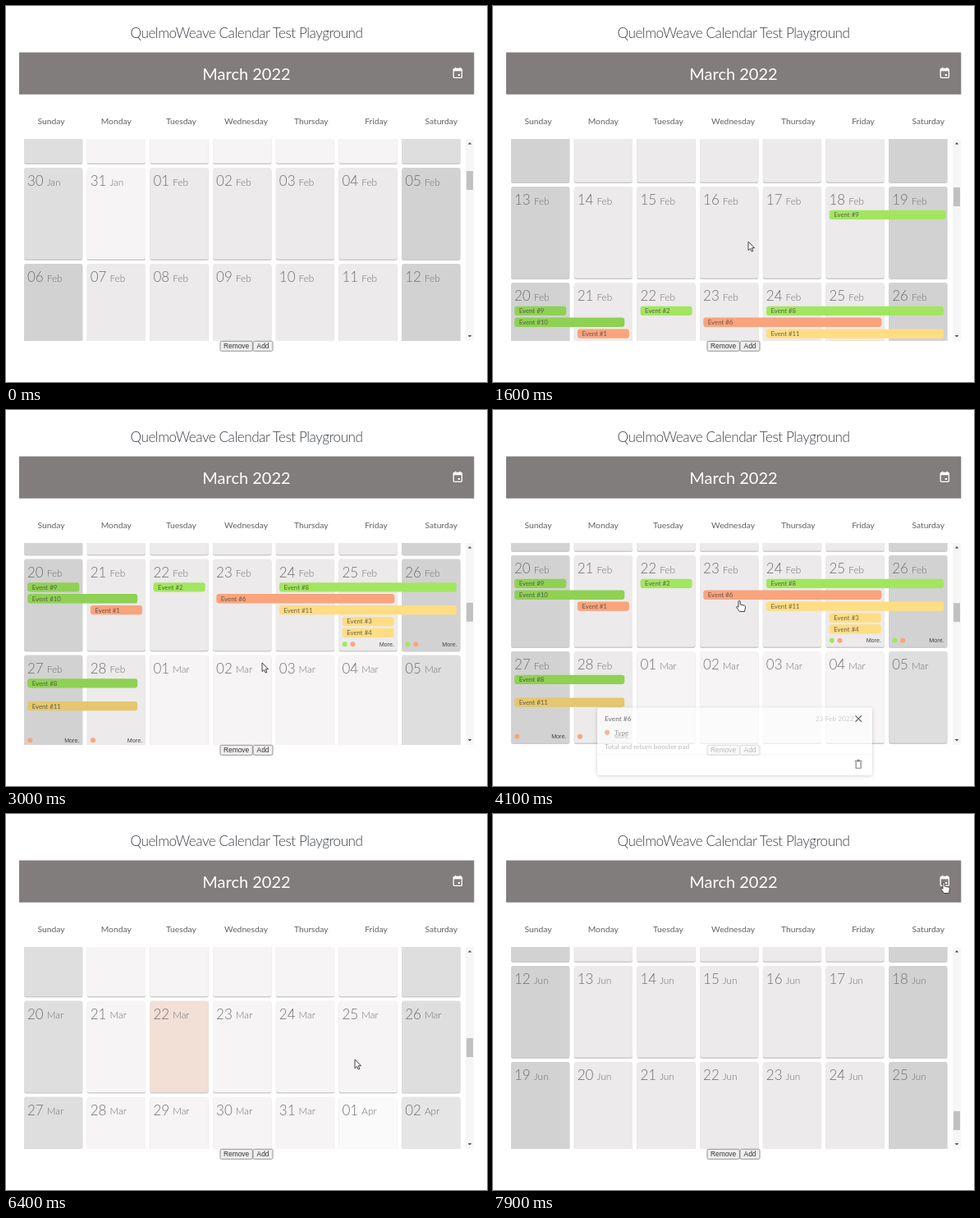
Write an HTML page that moves like this. It is 586 by 458 pixels and loops after 8 s.

```html
<!DOCTYPE html>
<html lang="en">
<head>
<meta charset="utf-8">
<title>Calendar playground</title>
<style>
  html, body { margin: 0; width: 100%; height: 100%; overflow: hidden; background: #fff; }
  svg { display: block; width: 586px; height: 458px; font-family: Lato, "Open Sans", sans-serif; }
  .title { font-size: 17.2px; font-weight: 300; letter-spacing: -.5px; fill: #3c4046; }
  .mid { text-anchor: middle; }
  .month { font-size: 20px; fill: #fff; }
  .weekday { font-size: 10.3px; fill: #626262; }
  .day { font-size: 17px; font-weight: 300; fill: #707070; }
  .day .name { font-size: 11.8px; fill: #707070; }
  .event { font-size: 7.8px; fill: #444; fill-opacity: .8; }
  .more { font: 7.2px "Liberation Sans", Arial, sans-serif; fill: #444; text-anchor: end; }
  .button { font: 8.4px "Liberation Sans", Arial, sans-serif; fill: #333; }
  .small { font-size: 8.3px; }
</style>
</head>
<body>
<svg viewBox="0 0 586 458">
  <defs>
    <clipPath id="view"><rect x="16" y="162" width="543" height="246"/></clipPath>
    <filter id="soft" x="-10%" y="-10%" width="120%" height="130%">
      <feDropShadow dx="0" dy="1" stdDeviation="2.5" flood-opacity=".28"/>
    </filter>
  </defs>
  <rect width="586" height="458" fill="#fff"/>
  <text class="title mid" x="293" y="39">QuelmoWeave Calendar Test Playground</text>
  <rect x="16" y="56.5" width="554.3" height="51.2" fill="#827d7d"/>
  <text class="month mid" x="293" y="90">March 2022</text>
  <g fill="none" stroke="#fff" stroke-width="1.3">
    <rect x="545.2" y="76.5" width="10.2" height="10.8" rx="1"/>
    <path d="M545 78h10.6" stroke-width="2.6"/>
    <path d="M547.6 74.8v2M553 74.8v2"/>
    <path d="M550.8 84h2.2" stroke-width="2"/>
  </g>
  <g id="weekdays"></g>
  <g clip-path="url(#view)"><g id="grid"></g></g>
  <rect x="560" y="162" width="10" height="246" fill="#f6f6f6"/>
  <path d="M562.6 168.5l2.4-2.6 2.4 2.6zM562.6 401l2.4 2.6 2.4-2.6z" fill="#505050"/>
  <rect id="thumb" x="561" width="8" height="23" fill="#c1c1c1"/>
  <g fill="#efefef" stroke="#8a8a8a" stroke-width=".9">
    <rect x="261" y="408.3" width="39.3" height="12" rx="1.5"/>
    <rect x="301" y="408.3" width="24" height="12" rx="1.5"/>
  </g>
  <text class="button mid" x="280.6" y="417.3">Remove</text>
  <text class="button mid" x="313" y="417.3">Add</text>

  <g id="modal">
    <rect x="127" y="374" width="335" height="82" rx="2" fill="#fff" filter="url(#soft)"/>
    <text class="small" x="136" y="390.5" fill="#333">Event #6</text>
    <text class="small" x="393" y="390" fill="#bbb">23 Feb 2022</text>
    <path d="M441.5 383.5l7.5 7.5m0-7.5l-7.5 7.5" stroke="#333" stroke-width="1.3"/>
    <circle cx="139" cy="404" r="3" fill="#f59a72"/>
    <text class="small" x="148" y="407" fill="#777">Type</text>
    <text class="small" x="136" y="424" fill="#999">Total and return booster pad</text>
    <path d="M127 431h335" stroke="#eee"/>
    <path d="M442.2 440v7.6h6V440M440.8 439h8.8M443.7 437.8h3" fill="none" stroke="#444" stroke-width="1.2"/>
  </g>
  <g id="pointer" stroke="#333" stroke-width=".9" stroke-linejoin="round" fill="#fff">
    <path id="arrow" d="M0 0v10.6l2.5-2.2 1.7 3.7 1.7-.8-1.7-3.6h3.4z"/>
    <path id="hand" d="M-1 1q1.2-1.4 2.2 0v4l5.3 1.2q1.2.5 1 1.8l-1 5.5h-6l-3.8-5q0-1.6 1.5-1l.8.8z"/>
  </g>
</svg>
<script>
const LOOP = 8000, STEP = 100;
const COL = 76.7, ROW = 117, LEFT = 22, TOP = 197;
const $ = id => document.getElementById(id);

function add(parent, tag, attrs, text) {
  const el = document.createElementNS("http://www.w3.org/2000/svg", tag);
  for (const key in attrs) el.setAttribute(key, attrs[key]);
  if (text !== undefined) el.textContent = text;
  parent.appendChild(el);
  return el;
}

// Linear reading of a table of [position, value] stops.
function at(stops, x) {
  if (x <= stops[0][0]) return stops[0][1];
  for (let i = 1; i < stops.length; i++) {
    const [a, from] = stops[i - 1], [b, to] = stops[i];
    if (x <= b) return from + (to - from) * (x - a) / (b - a);
  }
  return stops[stops.length - 1][1];
}

const names = ["Jan", "Feb", "Mar", "Apr", "May", "Jun", "Jul"];
// Each month has its own strength: [weekday, weekend]
const strong = ["#eceaeb", "#d2d2d2"], light = ["#f6f4f5", "#dedede"], faint = ["#fafafa", "#e5e5e5"];
const tones = [light, strong, light, faint, light, strong, light];

["Sunday", "Monday", "Tuesday", "Wednesday", "Thursday", "Friday", "Saturday"]
  .forEach((d, i) => add($("weekdays"), "text", { class: "weekday mid", x: 55 + 79.2 * i, y: 143.5 }, d));

const grid = $("grid");
function drawCell(row, col) {
  const date = new Date(Date.UTC(2022, 0, 30 + row * 7 + col));
  const month = date.getUTCMonth(), day = date.getUTCDate();
  const x = LEFT + COL * col, y = TOP + ROW * row;
  const today = month === 2 && day === 22;
  const fill = today ? "#f2dfd6" : tones[month][col % 6 ? 0 : 1];
  const box = { x, width: 71.3, height: 111.5, rx: 2.5 };
  add(grid, "rect", { ...box, y: y + 1.5, fill: "#000", "fill-opacity": .2 });
  add(grid, "rect", { ...box, y, fill });
  const label = add(grid, "text", { class: "day", x: x + 4, y: y + 22 }, String(day).padStart(2, "0"));
  add(label, "tspan", { class: "name", dx: 4, dy: -.5 }, names[month]);
}
for (let row = -1; row <= 20; row++)
  for (let col = 0; col < 7; col++) drawCell(row, col);

const GREEN = "#a2e65f", MOSS = "#8fd153", ORANGE = "#f9a47c", YELLOW = "#ffdd82", OCHRE = "#e4c76e";
// row, column, lane, width, number, colour
[
  [2, 5, 0, 142, 9, GREEN],
  [3, 0, 0, 63, 9, MOSS],
  [3, 0, 1, 134, 10, MOSS],
  [3, 1, 2, 63, 1, ORANGE],
  [3, 2, 0, 63, 2, GREEN],
  [3, 3, 1, 217, 6, ORANGE],
  [3, 4, 0, 216, 8, GREEN],
  [3, 4, 2, 216, 11, YELLOW],
  [3, 5, 3, 63, 3, YELLOW],
  [3, 5, 4, 63, 4, YELLOW],
  [4, 0, 0, 134, 8, MOSS],
  [4, 0, 2, 134, 11, OCHRE]
].forEach(([row, col, lane, width, n, fill]) => {
  const x = LEFT + COL * col + 4.2, y = TOP + ROW * row + 28.7 + 13.9 * lane;
  add(grid, "rect", { x, y, width, height: 11.3, rx: 3, fill });
  add(grid, "text", { class: "event", x: x + 5.5, y: y + 8.5 }, "Event #" + n);
});

// Overflow marks at the foot of crowded days
[[3, 5, [GREEN, ORANGE]], [3, 6, [GREEN, ORANGE]], [4, 0, [ORANGE]], [4, 1, [ORANGE]]]
  .forEach(([row, col, dots]) => {
    const x = LEFT + COL * col, y = TOP + ROW * row + 103.7;
    dots.forEach((fill, i) => add(grid, "circle", { cx: x + 7.3 + 9.7 * i, cy: y, r: 3, fill }));
    add(grid, "text", { class: "more", x: x + 67.5, y: y + 2.5 }, "More.");
  });

const scroll = [[0, 0], [300, 22], [900, 117], [1600, 211], [1900, 235], [2200, 295], [2600, 350],
  [3000, 366.5], [3300, 371], [5700, 371], [6000, 520], [6400, 788.5], [6800, 1420], [7200, 2060], [7500, 2235]];
const thumb = [[0, 201], [211, 221], [295, 228], [369, 235], [788, 273], [2235, 362]];
const fade = [[3900, 0], [4200, 1], [5100, 1], [5300, .55], [5600, 0]];
const slide = [[3900, 40], [4200, -37], [5100, -37], [5300, 0], [5600, 40]];
const path = [[600, 318, 330], [1600, 311, 287], [2200, 319, 290], [3000, 312, 308], [3700, 300, 232],
  [4400, 300, 232], [5000, 446, 349], [5300, 450, 350], [6400, 425, 299], [7000, 440, 250], [7500, 549, 83]];
const pathX = path.map(p => [p[0], p[1]]), pathY = path.map(p => [p[0], p[2]]);

function show(el, on) { el.style.display = on ? "" : "none"; }

function render(t) {
  const s = at(scroll, t), opacity = at(fade, t);
  grid.setAttribute("transform", `translate(0 ${-s})`);
  $("thumb").setAttribute("y", at(thumb, s));
  $("modal").setAttribute("transform", `translate(0 ${at(slide, t)})`);
  $("modal").setAttribute("opacity", opacity);
  show($("modal"), opacity > 0);
  const hand = t >= 7500 || (t >= 3700 && t < 4500);
  show($("pointer"), t >= 600);
  show($("hand"), hand);
  show($("arrow"), !hand);
  $("pointer").setAttribute("transform", `translate(${at(pathX, t)} ${at(pathY, t)})`);
}

const start = performance.now();
function tick() {
  const t = (performance.now() - start) % LOOP;
  render(Math.floor(t / STEP) * STEP);
  requestAnimationFrame(tick);
}
tick();
</script>
</body>
</html>
```
